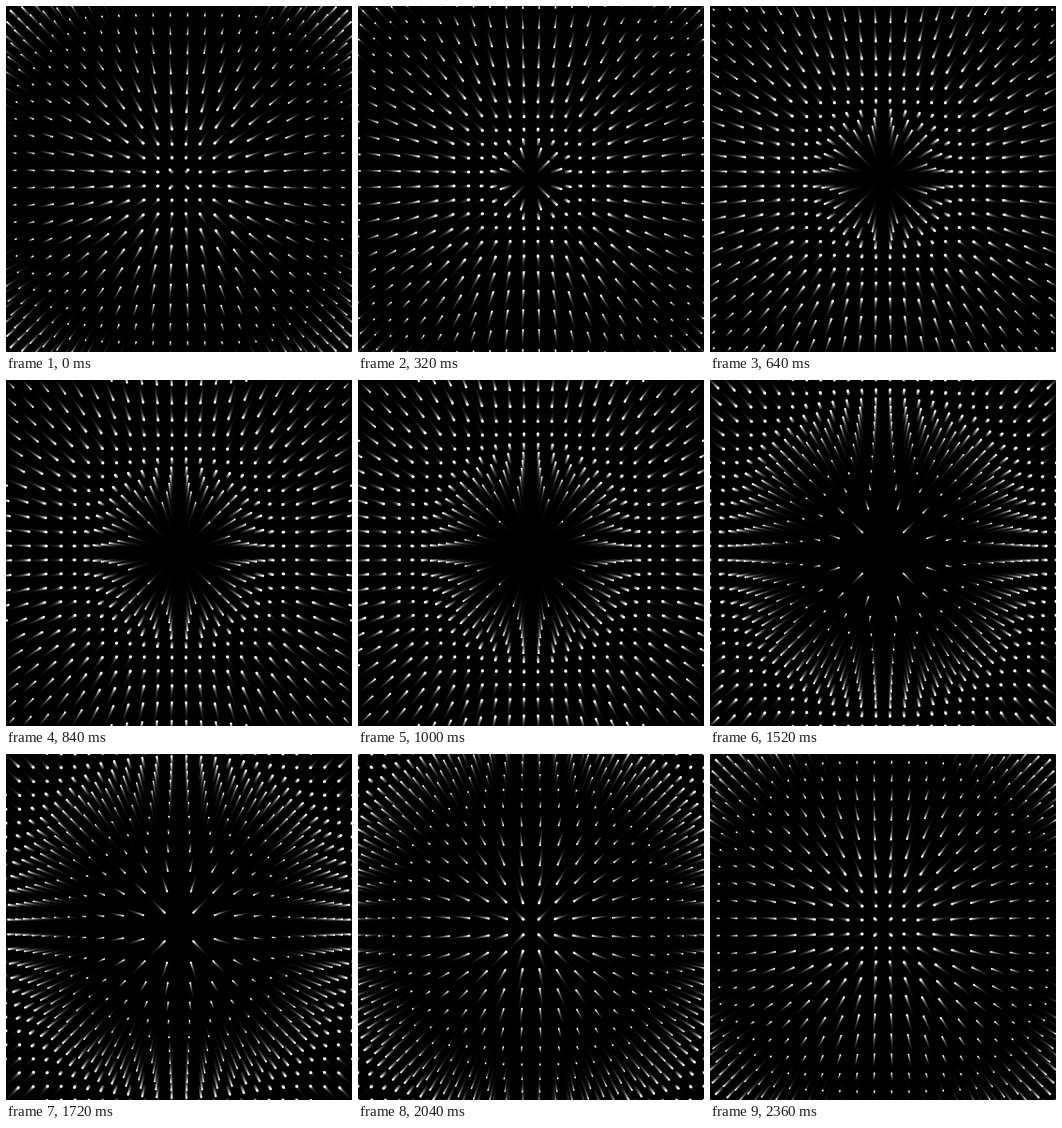
Recreate the animation shown at these times as an HTML page with a canvas. Size 500x500 px, loop 2400 ms.

```html
<!DOCTYPE html>
<html lang="en">
<head>
<meta charset="utf-8">
<title>Radial dot wave</title>
<style>
html, body { margin: 0; width: 100%; height: 100%; overflow: hidden; background: #000; }
canvas { display: block; width: 500px; height: 500px; }
</style>
</head>
<body>
<canvas id="stage" width="500" height="500"></canvas>
<script>
const ctx = document.getElementById('stage').getContext('2d');
const SIZE = 500, MID = SIZE / 2, PITCH = 20;
const STEP = 40, STEPS = 60;
const WAVE = 350, REST = 48, PUSH = 50;
const TRAIL = 18, FADE = 0.75;
const R_REST = 2.05, R_FAR = 1.05;
const TAU = Math.PI * 2;

const dots = [];
for (let y = -MID; y <= MID; y += PITCH) {
  for (let x = -MID; x <= MID; x += PITCH) {
    const r = Math.hypot(x, y);
    dots.push({ r, ux: x / r, uy: y / r });
  }
}

// All dots at one step, as a single path.
function drawDots(step, shade) {
  const v = Math.round(255 * shade);
  ctx.fillStyle = `rgb(${v},${v},${v})`;
  ctx.beginPath();
  for (const { r, ux, uy } of dots) {
    const k = (1 - Math.cos(TAU * ((r - REST) / WAVE - step / STEPS))) / 2;
    const dist = r + PUSH * k;
    const x = MID + ux * dist, y = MID + uy * dist;
    if (x < -3 || y < -3 || x > SIZE + 3 || y > SIZE + 3) continue;
    const rad = R_REST + (R_FAR - R_REST) * k;
    ctx.moveTo(x + rad, y);
    ctx.arc(x, y, rad, 0, TAU);
  }
  ctx.fill();
}

// Oldest echoes first, so newer dots cover the fading trail.
function draw(step) {
  ctx.fillStyle = '#000';
  ctx.fillRect(0, 0, SIZE, SIZE);
  for (let age = TRAIL; age >= 0; age--) drawDots(step - age, FADE ** age);
}

const start = performance.now();
let shown = 0;
draw(0);

function tick() {
  const t = Math.max(0, performance.now() - start);
  const step = Math.floor(t / STEP) % STEPS;
  if (step !== shown) draw(shown = step);
  requestAnimationFrame(tick);
}
requestAnimationFrame(tick);
</script>
</body>
</html>
```
